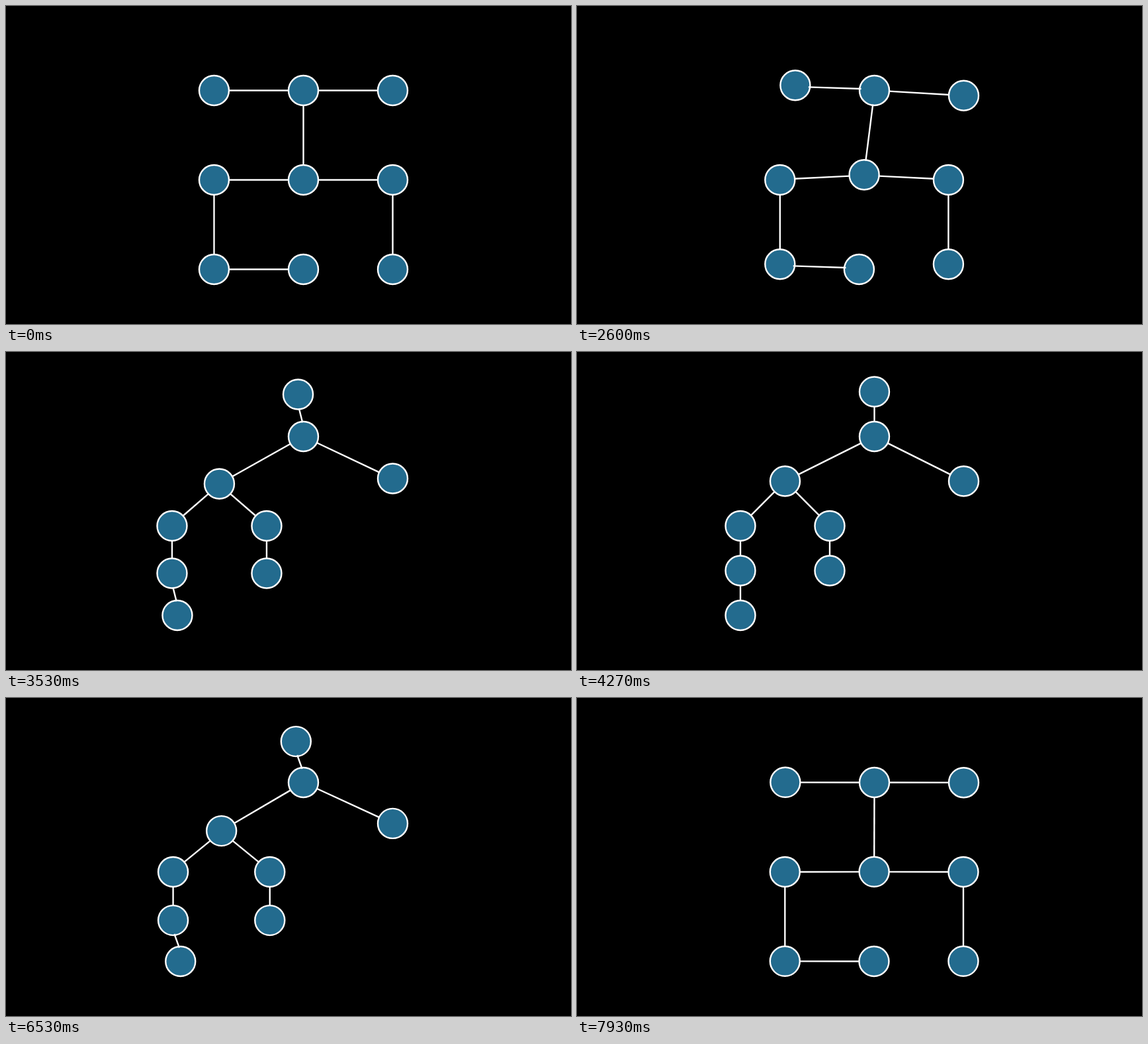
Recreate the animation shown at these times as an HTML page with a canvas. Size 854 by 480 pixels, loop 7990 ms.

```html
<!DOCTYPE html>
<html lang="en">
<head>
<meta charset="utf-8">
<title>Graph layout</title>
<style>
  html, body { margin: 0; width: 100%; height: 100%; overflow: hidden; background: #000; }
  canvas { display: block; width: 854px; height: 480px; }
</style>
</head>
<body>
<canvas id="stage" width="854" height="480"></canvas>
<script>
const ctx = document.getElementById('stage').getContext('2d');
const LOOP = 7990, FPS = 15, RADIUS = 22.5;

// Node positions in cells: [grid x, grid y, tree x, tree y]
const nodes = {
  a: [1, 1, 3, 0], b: [3, 1, 3, 1], c: [5, 1, 5, 2],
  d: [3, 3, 1, 2], e: [1, 3, 0, 3], f: [5, 3, 2, 3],
  g: [1, 5, 0, 4], h: [3, 5, 0, 5], i: [5, 5, 2, 4]
};
const links = ['ab', 'bc', 'bd', 'de', 'df', 'eg', 'fi', 'gh'];

const toPixels = (x, y) => [247 + 67.5 * x, 60 + 67.5 * y];
const mix = (p, q, k) => p.map((v, n) => v + (q[n] - v) * k);

const circles = Object.values(nodes).map(([gx, gy, tx, ty]) =>
  [toPixels(gx, gy), toPixels(tx, ty)]);

// A segment between two nodes, trimmed to their rims: [x1, y1, x2, y2]
function segment(from, to, layout) {
  const [x1, y1] = toPixels(...nodes[from].slice(layout, layout + 2));
  const [x2, y2] = toPixels(...nodes[to].slice(layout, layout + 2));
  const scale = RADIUS / Math.hypot(x2 - x1, y2 - y1);
  const dx = (x2 - x1) * scale, dy = (y2 - y1) * scale;
  return [x1 + dx, y1 + dy, x2 - dx, y2 - dy];
}
const segments = links.map(([from, to]) => [segment(from, to, 0), segment(from, to, 2)]);

// Normalised sigmoid easing
function smooth(t) {
  if (t <= 0) return 0;
  if (t >= 1) return 1;
  const sigmoid = x => 1 / (1 + Math.exp(-x));
  const tail = sigmoid(-5);
  return (sigmoid(10 * (t - 0.5)) - tail) / (1 - 2 * tail);
}

// 0 is the grid, 1 is the tree; time advances in steps of 1/15 s
function layoutAt(ms) {
  const step = Math.floor((Math.floor(ms / 10) * 10 + 5) * FPS / 1000);
  return smooth((step - 30) / 30) - smooth((step - 90) / 30);
}

function draw(k) {
  ctx.fillStyle = '#000';
  ctx.fillRect(0, 0, 854, 480);
  ctx.fillStyle = '#236b8e';
  ctx.strokeStyle = '#fff';
  ctx.lineWidth = 2.4;
  for (const [grid, tree] of circles) {
    ctx.beginPath();
    ctx.arc(...mix(grid, tree, k), RADIUS, 0, 2 * Math.PI);
    ctx.fill();
    ctx.stroke();
  }
  for (const [grid, tree] of segments) {
    const [x1, y1, x2, y2] = mix(grid, tree, k);
    ctx.beginPath();
    ctx.moveTo(x1, y1);
    ctx.lineTo(x2, y2);
    ctx.stroke();
  }
}

const start = performance.now();
function tick() {
  draw(layoutAt((performance.now() - start) % LOOP));
  requestAnimationFrame(tick);
}
tick();
</script>
</body>
</html>
```
